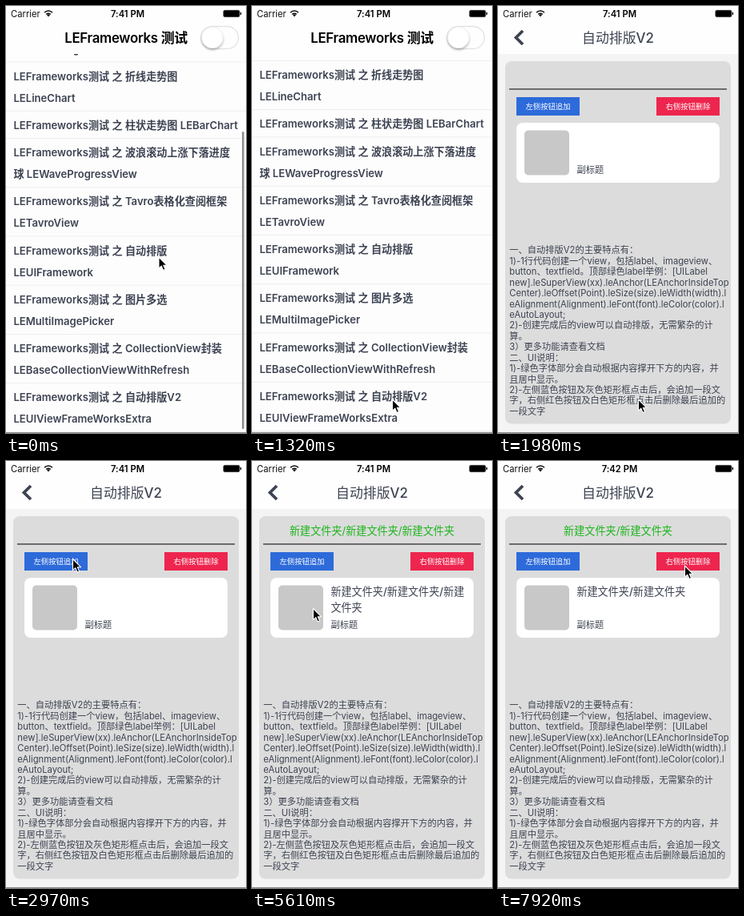
These frames come from a looping animation (300x534 px, 8000 ms). An HTML page:

```html
<!DOCTYPE html>
<html lang="zh-CN">
<head>
<meta charset="utf-8">
<style>
  html, body { margin: 0; width: 100%; height: 100%; overflow: hidden; background: #fff; }
  svg { display: block; width: 100vw; height: 100vh; }
  text {
    font-family: Inter, "Noto Sans CJK SC", "Noto Sans CJK", "Noto Sans CJK JP", sans-serif;
    font-feature-settings: "calt" 0;
    fill: #3d4352;
  }
</style>
</head>
<body>
<svg id="stage" viewBox="0 0 300 534">
  <defs>
    <filter id="soft" x="-50%" y="-50%" width="200%" height="200%">
      <feDropShadow dx="0" dy="2" stdDeviation="1.6" flood-opacity=".3"/>
    </filter>
    <linearGradient id="edge">
      <stop offset="0" stop-color="#000" stop-opacity="0"/>
      <stop offset="1" stop-color="#000" stop-opacity=".1"/>
    </linearGradient>
  </defs>
</svg>
<script>
(() => {
const LOOP = 8000, STEP = 330;
const stage = document.getElementById('stage');

function el(tag, attrs, parent) {
  const node = document.createElementNS('http://www.w3.org/2000/svg', tag);
  for (const key in attrs) node.setAttribute(key, attrs[key]);
  parent.append(node);
  return node;
}
const group = parent => el('g', {}, parent);
const box = (parent, x, y, width, height, fill, rx = 0) =>
  el('rect', { x, y, width, height, fill, rx }, parent);
// midY is the optical middle of the line
function label(parent, str, x, midY, size, attrs = {}) {
  const node = el('text', { x, y: midY + size * .365, 'font-size': size, ...attrs }, parent);
  node.textContent = str;
  return node;
}
const move = (node, x, y) => node.setAttribute('transform', `translate(${x} ${y})`);
const show = (node, on) => node.setAttribute('visibility', on ? 'visible' : 'hidden');

// List page
const ROWS = [
  ['LEFrameworks测试 之 折线走势图', 'LELineChart'],
  ['LEFrameworks测试 之 柱状走势图 LEBarChart'],
  ['LEFrameworks测试 之 波浪滚动上涨下落进度', '球 LEWaveProgressView'],
  ['LEFrameworks测试 之 Tavro表格化查阅框架', 'LETavroView'],
  ['LEFrameworks测试 之 自动排版', 'LEUIFramework'],
  ['LEFrameworks测试 之 图片多选', 'LEMultiImagePicker'],
  ['LEFrameworks测试 之 CollectionView封装', 'LEBaseCollectionViewWithRefresh'],
  ['LEFrameworks测试 之 自动排版V2', 'LEUIViewFrameWorksExtra']
];
const listPage = group(stage);
box(listPage, 0, 0, 300, 534, '#f1f1f1');
const rows = group(listPage);
box(rows, 0, 0, 300, 533, '#fdfdfd');
box(rows, 85, 59, 5, 2.4, '#3d4352', 1);
let rowTop = 70;
box(rows, 0, rowTop - .5, 300, .8, '#ececec');
for (const lines of ROWS) {
  lines.forEach((line, i) =>
    label(rows, line, 9.4, rowTop + 17.9 + i * 27, 13.125, { 'font-weight': 600 }));
  rowTop += lines.length > 1 ? 61.25 : 34.3;
  box(rows, 0, rowTop - .5, 300, .8, '#ececec');
}
box(listPage, 0, 0, 300, 60, '#fefefe');
label(listPage, 'LEFrameworks 测试', 150, 40, 16.9,
  { 'text-anchor': 'middle', 'font-weight': 600, 'letter-spacing': '-.02em', style: 'fill:#000' });
const track = box(listPage, 243.5, 25.5, 47, 28, '#fefefe', 14);
track.setAttribute('stroke', '#e3e3e3');
track.setAttribute('stroke-width', 1.3);
el('circle', { cx: 258, cy: 39.5, r: 13.2, fill: '#fff', stroke: '#e2e2e2', 'stroke-width': .5, filter: 'url(#soft)' }, listPage);
const thumb = box(listPage, 295, 157, 2.6, 372, '#8f8f8f', 1.3);
const shade = box(stage, 0, 0, 300, 534, '#000');

// Detail page
const NOTES = [
  '一、自动排版V2的主要特点有：',
  '1)-1行代码创建一个view，包括label、imageview、',
  'button、textfield。顶部绿色label举例：[UILabel',
  'new].leSuperView(xx).leAnchor(LEAnchorInsideTop',
  'Center).leOffset(Point).leSize(size).leWidth(width).l',
  'eAlignment(Alignment).leFont(font).leColor(color).l',
  'eAutoLayout;',
  '2)-创建完成后的view可以自动排版，无需繁杂的计',
  '算。',
  '3）更多功能请查看文档',
  '二、UI说明：',
  '1)-绿色字体部分会自动根据内容撑开下方的内容，并',
  '且居中显示。',
  '2)-左侧蓝色按钮及灰色矩形框点击后，会追加一段文',
  '字，右侧红色按钮及白色矩形框点击后删除最后追加的',
  '一段文字'
];
const detail = group(stage);
box(detail, -8, 0, 8, 534, 'url(#edge)');
box(detail, 0, 0, 300, 534, '#f4f4f4');
box(detail, 0, 0, 300, 60, '#fefefe');
el('path', { d: 'M31 31L22.5 39.5L31 48', fill: 'none', stroke: '#3d4352', 'stroke-width': 3.8 }, detail);
label(detail, '自动排版V2', 150, 40, 16.9, { 'text-anchor': 'middle', 'font-weight': 500 });
box(detail, 9, 69, 282, 453.5, '#dcdcdc', 8);
NOTES.forEach((line, i) => label(detail, line, 14.3, 305.3 + i * 13.43, 11.25));

const green = [87, 103].map(y =>
  label(detail, '', 150, y, 13.125, { 'text-anchor': 'middle', style: 'fill:#1bb51b' }));
const panel = group(detail);
box(panel, 14, 103.4, 272, 1.1, '#111');
function button(x, fill, str) {
  box(panel, x, 114, 79, 23, fill);
  label(panel, str, x + 39.5, 125.5, 9.375, { 'text-anchor': 'middle', style: 'fill:#fff' });
}
button(23, '#2d6ada', '左侧按钮追加');
button(198, '#ee254e', '右侧按钮删除');
box(panel, 23, 146, 254, 75, '#fff', 8);
box(panel, 33, 155.5, 56, 56, '#c8c8c8', 5);
const heading = [163, 183].map(y => label(panel, '', 98.4, y, 13.125, { 'font-weight': 500 }));
label(panel, '副标题', 98.4, 205, 11.25);

// Status bar
label(stage, 'Carrier', 6, 9.6, 11.25, { style: 'fill:#111' });
const wifi = group(stage);
for (const r of [3.6, 6.6])
  el('path', { d: `M${53 - r * .75} ${13 - r * .72}A${r} ${r} 0 0 1 ${53 + r * .75} ${13 - r * .72}`,
    fill: 'none', stroke: '#111', 'stroke-width': 1.6 }, wifi);
el('path', { d: 'M53 13.4L51 11.2A2.8 2.8 0 0 1 55 11.2Z', fill: '#111' }, wifi);
const clock = label(stage, '', 152, 9.6, 11.25,
  { 'text-anchor': 'middle', 'font-weight': 600, style: 'fill:#000' });
const battery = box(stage, 271.9, 5.4, 20, 8.2, '#000', 1.6);
battery.setAttribute('stroke', '#000');
battery.setAttribute('stroke-width', .6);
box(stage, 292.8, 7.8, 1.3, 3.4, '#000', .6);
box(stage, 0, 533, 300, 1, '#8c8c8c');

const pointer = el('path', {
  d: 'M0 0V14.2L3.3 11.2L5.6 16.4L8.1 15.3L5.8 10.3H10.2Z',
  fill: '#000', stroke: '#fff', 'stroke-width': 1.1, 'stroke-linejoin': 'round'
}, stage);

// Each track lists [step, value]; a value holds until the next entry
const SCROLL = [[0, 0], [1, -9], [2, -7], [3, -3], [4, -1.5]];
const PUSH = [[0, 0], [5, .87], [6, 1]];
const COUNT = [[0, 0], [10, 1], [12, 2], [16, 3], [18, 4], [22, 3], [24, 2]];
const POINTER = [
  [0, [191, 314]], [1, [193, 338]], [2, [193.5, 371]], [3, [183, 440]], [4, [175.5, 492]],
  [7, [130, 310]], [8, [84, 124]], [9, [83.5, 122.5]], [14, [79, 152]], [15, [76.5, 184.5]],
  [20, [175, 152]], [21, [233.5, 137]], [22, [233.5, 131]]
];
const at = (list, step) => list.filter(([from]) => from <= step).pop()[1];

function draw(now) {
  const step = Math.floor((now % LOOP) / STEP);
  const scroll = at(SCROLL, step), push = at(PUSH, step), count = at(COUNT, step);

  move(listPage, -90 * push, 0);
  move(rows, 0, scroll);
  thumb.setAttribute('y', 157 - scroll);
  thumb.setAttribute('height', 372 + scroll);
  show(thumb, step < 4);
  shade.setAttribute('opacity', .1 * push);
  move(detail, 300 * (1 - push), 0);
  show(detail, push > 0);

  const str = Array(count).fill('新建文件夹').join('/');
  green[0].textContent = str.slice(0, 22);
  green[1].textContent = str.slice(22);
  heading[0].textContent = str.slice(0, 14);
  heading[1].textContent = str.slice(14);
  move(panel, 0, str.length > 22 ? 16 : 0);

  clock.textContent = step < 23 ? '7:41 PM' : '7:42 PM';
  move(pointer, ...at(POINTER, step));
}

const start = performance.now();
function tick() {
  draw(performance.now() - start);
  requestAnimationFrame(tick);
}
tick();
})();
</script>
</body>
</html>
```
